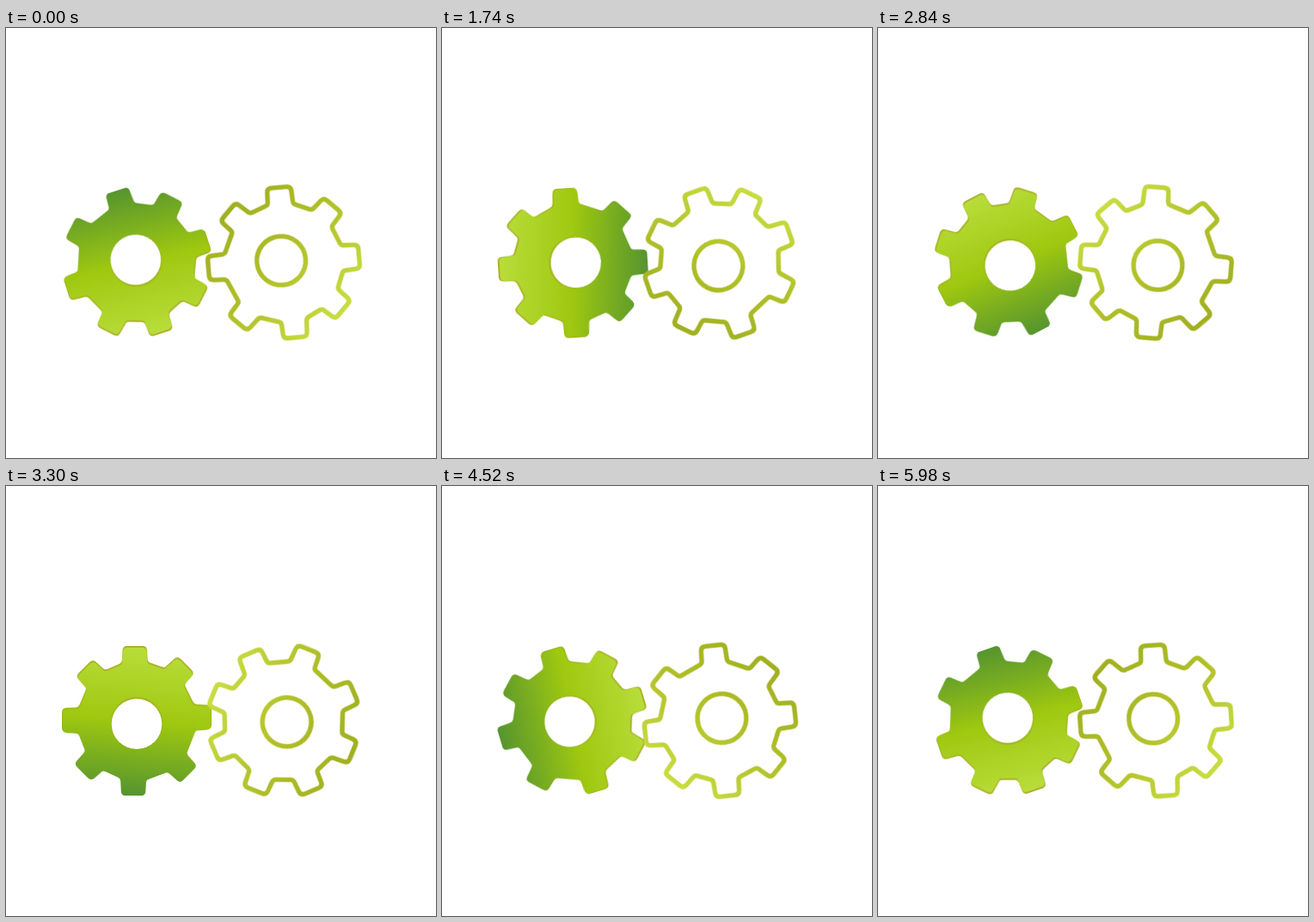
Animation of 500x500 px, one loop 6 s. Source, as an HTML page:

```html
<!DOCTYPE html>
<html lang="en">
<head>
<meta charset="utf-8">
<title>Gears</title>
<style>
  html, body { margin: 0; width: 100%; height: 100%; overflow: hidden; background: #fff; }
  svg { display: block; width: 100vw; height: 100vh; }
  .spin { transform-origin: 0 0; animation: turn 6s linear infinite; }
  .back { animation-direction: reverse; }
  @keyframes turn { from { transform: rotate(0deg); } to { transform: rotate(360deg); } }
  .line { fill: none; stroke: url(#wire); stroke-width: 5.4; stroke-linejoin: round; }
</style>
</head>
<body>
<svg viewBox="0 0 500 500">
  <defs>
    <linearGradient id="face" gradientUnits="userSpaceOnUse" x1="0" y1="-88" x2="0" y2="88" gradientTransform="rotate(5)">
      <stop offset="0" stop-color="#55942f"/>
      <stop offset=".5" stop-color="#9fc810"/>
      <stop offset="1" stop-color="#b9de3c"/>
    </linearGradient>
    <linearGradient id="rim" gradientUnits="userSpaceOnUse" x1="0" y1="-88" x2="0" y2="88" gradientTransform="rotate(5)">
      <stop offset="0" stop-color="#55942f"/>
      <stop offset=".5" stop-color="#9fb81a"/>
      <stop offset="1" stop-color="#b0b02e"/>
    </linearGradient>
    <linearGradient id="wire" gradientUnits="userSpaceOnUse" x1="0" y1="-88" x2="0" y2="88">
      <stop offset="0" stop-color="#a0b020"/>
      <stop offset=".5" stop-color="#b0c028"/>
      <stop offset="1" stop-color="#c8dc40"/>
    </linearGradient>
  </defs>

  <g transform="translate(152 273) rotate(-18)">
    <g class="spin" fill-rule="evenodd">
      <path id="base" fill="url(#rim)"/>
      <path id="top" fill="url(#face)"/>
    </g>
  </g>

  <g transform="translate(323 273) rotate(-50)">
    <g class="spin back">
      <path id="outline" class="line"/>
      <circle class="line" cy="-3.8" r="28.4"/>
    </g>
  </g>
</svg>
<script>
  const TEETH = 8;

  // Sideways drift of the tooth at angle a: the teeth are off the axle and unevenly spaced.
  const drift = a => 2.5 * Math.cos(a) - 3.1 * Math.sin(a) + 1.9 * Math.sin(2 * a - .75) - .5;

  // Closed polygon with rounded corners; each point is [x, y, radius].
  function roundPath(pts) {
    const toward = (p, q) => {
      const len = Math.hypot(q[0] - p[0], q[1] - p[1]);
      const k = Math.min(p[2], len / 2) / len;
      return [p[0] + (q[0] - p[0]) * k, p[1] + (q[1] - p[1]) * k];
    };
    const fmt = p => p[0].toFixed(2) + ' ' + p[1].toFixed(2);
    return pts.map((p, i) => {
      const prev = pts[(i + pts.length - 1) % pts.length];
      const next = pts[(i + 1) % pts.length];
      return (i ? 'L' : 'M') + fmt(toward(p, prev)) + 'Q' + fmt(p) + ' ' + fmt(toward(p, next));
    }).join('') + 'Z';
  }

  function gearPath(tip, root, half, dy = 0) {
    const pts = [];
    for (let i = 0; i < TEETH; i++) {
      const a = i * 2 * Math.PI / TEETH;
      const c = Math.cos(a), s = Math.sin(a);
      const side = drift(a);
      const add = (along, across, r) => {
        const t = across + side;
        pts.push([along * c - t * s, along * s + t * c + dy, r]);
      };
      const foot = t => Math.sqrt(root * root - (t + side) ** 2);
      add(foot(-half - .5), -half - .5, 3);
      add(tip, -half + .5, 5);
      add(tip, half - .5, 5);
      add(foot(half + .5), half + .5, 3);
    }
    return roundPath(pts);
  }

  const hole = (y, r) => `M${-r} ${y}a${r} ${r} 0 1 0 ${2 * r} 0a${r} ${r} 0 1 0 ${-2 * r} 0Z`;
  const draw = (id, d) => document.getElementById(id).setAttribute('d', d);

  draw('base', gearPath(87, 69.6, 14.5) + hole(-3.7, 29.3));
  draw('top', gearPath(86, 68.7, 14, -1.1) + hole(-2.6, 30.4));
  draw('outline', gearPath(87.8, 69.5, 14.3));
</script>
</body>
</html>
```
